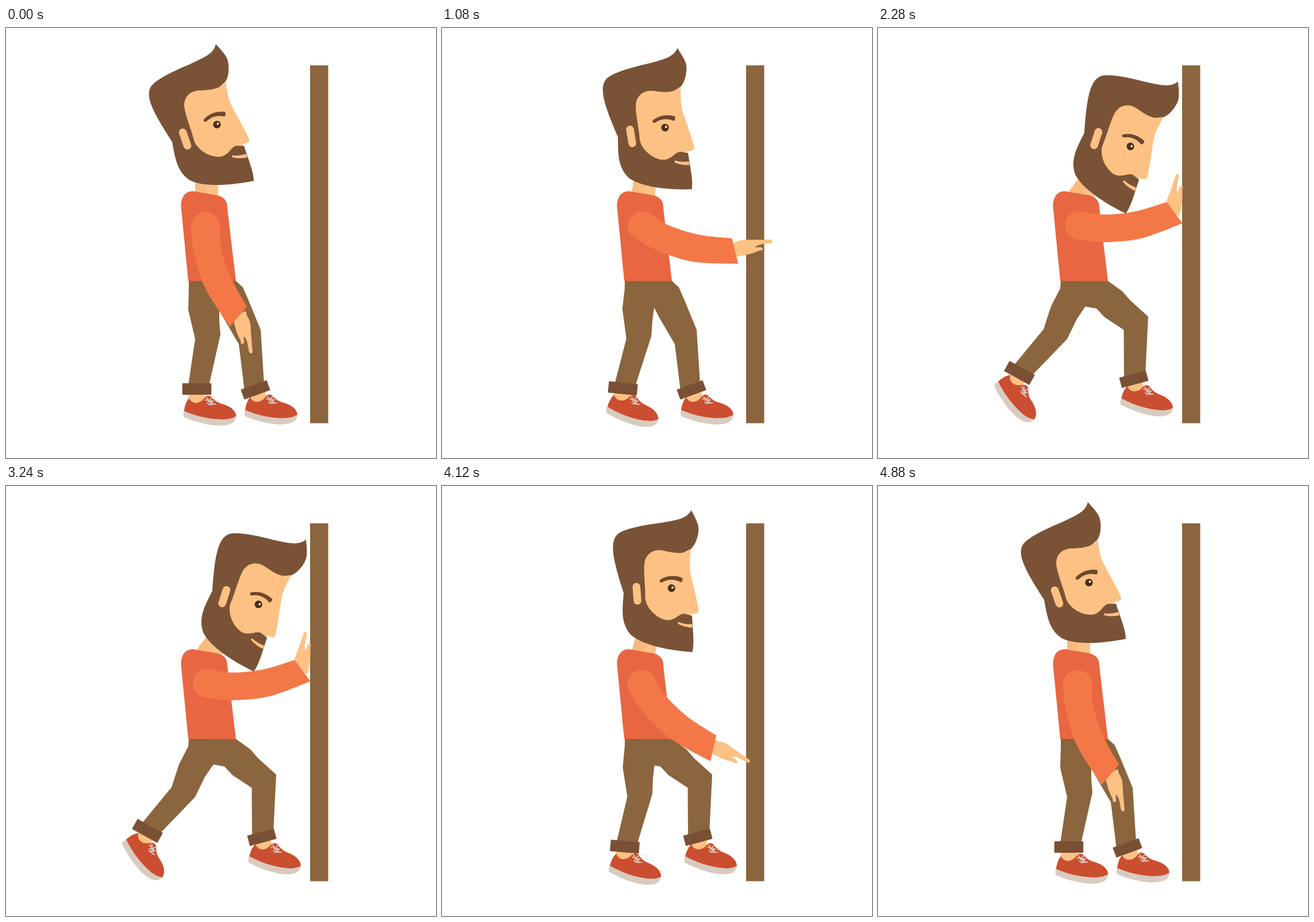
These frames come from a looping animation (748x748 px, 6 s). An HTML page with a canvas:

```html
<!DOCTYPE html>
<html lang="en">
<head>
<meta charset="utf-8">
<title>Pushing a wall</title>
<style>
html, body { margin: 0; width: 100%; height: 100%; overflow: hidden; background: #fff; }
canvas { display: block; width: 100%; height: 100%; }
</style>
</head>
<body>
<canvas id="stage" width="748" height="748"></canvas>
<script>
const ctx = document.getElementById('stage').getContext('2d');
const LOOP = 6000, STEP = 40, RAD = Math.PI / 180;
const C = {
  wood: '#8b653e', cuff: '#7a5035', hair: '#7a5236', dark: '#6d482d', skin: '#fdc184',
  neck: '#f8ba7d', torso: '#e86642', arm: '#f47847', shoe: '#cb4e30', sole: '#d8cbc0', eye: '#4c2d18'
};

const linear = x => x;
const smooth = x => x * x * (3 - 2 * x);
const mix = (a, b, p) => a + (b - a) * p;
const mixPoints = (a, b, p) => a.map((v, i) => [mix(v[0], b[i][0], p), mix(v[1], b[i][1], p)]);
const phase = (t, from, to, ease) => ease(Math.min(1, Math.max(0, (t - from) / (to - from))));
const polar = ([x, y], angle, r) => [x + r * Math.cos(angle * RAD), y + r * Math.sin(angle * RAD)];

function fill(path, color) {
  ctx.fillStyle = color;
  ctx.fill(path);
}

function poly(points, color) {
  const path = new Path2D();
  points.forEach(p => path.lineTo(p[0], p[1]));
  path.closePath();
  fill(path, color);
}

// Smooth curve through all points
function spline(path, points) {
  const at = i => points[Math.min(points.length - 1, Math.max(0, i))];
  path.lineTo(...points[0]);
  for (let i = 0; i < points.length - 1; i++) {
    const [a, b, c, d] = [at(i - 1), at(i), at(i + 1), at(i + 2)];
    path.bezierCurveTo(b[0] + (c[0] - a[0]) / 6, b[1] + (c[1] - a[1]) / 6,
      c[0] - (d[0] - b[0]) / 6, c[1] - (d[1] - b[1]) / 6, c[0], c[1]);
  }
}

function placed(x, y, angle, draw) {
  ctx.save();
  ctx.translate(x, y);
  ctx.rotate(angle * RAD);
  draw();
  ctx.restore();
}

function stroke(path, color, width) {
  ctx.strokeStyle = color;
  ctx.lineWidth = width;
  ctx.lineCap = ctx.lineJoin = 'round';
  ctx.stroke(path);
}

function dot(x, y, r, color) {
  const path = new Path2D();
  path.arc(x, y, r, 0, 7);
  fill(path, color);
}

// Shoe, relative to the middle of its length
const ANKLE = new Path2D('M-36 -46H-11L-8 -33L-16 -22H-32L-37 -31Z');
const SHOE = new Path2D('M-45 -8C-44 -18 -41 -27 -36 -32C-31 -21 -17 -21 -9 -33Q-4 -39 2 -35C8 -28 14 -24 22 -22C36 -18 46 -10 46 0C30 10 -10 4 -45 -8Z');
const SOLE = new Path2D('M-45 -10Q-47 -3 -45 1C-26 9 -6 14 10 15.500C30 17 46 13 45.500 -1C30 10 -8 6 -45 -10Z');
const LACES = new Path2D('M-8 -29L6 -27L-2 -21L10 -22M4 -34L-4 -23M-6 -33L6 -21');

function foot(x, y, angle) {
  placed(x, y, angle, () => {
    fill(ANKLE, C.skin);
    fill(SHOE, C.shoe);
    fill(SOLE, C.sole);
    stroke(LACES, C.sole, 1.8);
  });
}

function cuff(x, y, angle, w, h) {
  placed(x, y, angle, () => {
    ctx.fillStyle = C.cuff;
    ctx.beginPath();
    ctx.roundRect(-w / 2, -h / 2, w, h, 1);
    ctx.fill();
  });
}

function backLeg(p) {
  const q = p * p;
  const x = 332 - 86 * p, y = 628 - 28 * q, turn = 29 * p;
  const hem = (dx, dy) => polar([x, y], turn + Math.atan2(dy, dx) / RAD, Math.hypot(dx, dy));
  foot(354.5 - 118 * p, 676 - 24.5 * q, 41 * p);
  poly([
    [318, 440], [318 - p, 453], [317 - 16 * p, 490 - 6 * p],
    [329 - 41 * p, 541 - 17 * q], hem(-15, -6), hem(21, -6),
    [373 - 44 * p, 533 + 18 * p - 10 * q], [371 - 25 * p, 510 - 4 * p],
    [371 - 10 * p, 488 - 4 * p], [385, 440]
  ], C.wood);
  cuff(x, y, turn, 50.5, 20);
}

const STAND = [[330, 440], [400, 440], [412, 451], [422, 474], [443, 525], [449, 620],
  [415, 632], [405, 550], [377, 502], [369, 486], [363, 484]];
const LUNGE = [[330, 440], [400, 440], [425, 458], [439, 474], [470, 502], [465, 604],
  [428, 612], [427.5, 525], [394, 503], [380, 488], [358, 484]];

function frontLeg(p) {
  foot(mix(461, 467, p), mix(674, 658, p), mix(-0.5, 5, p));
  poly(mixPoints(STAND, LUNGE, p), C.wood);
  cuff(mix(434, 445, p), mix(629.5, 611, p), mix(-20, -15, p), 48, 18.5);
}

const TORSO = new Path2D('M304.500 311C304 296 311 283 326 284L364 290.500Q382 293 384.500 307L386 322L400 440.500L317 440Z');
const HEAD = new Path2D('M365 28C361 45 345 51 320 63C296 73 262 88 252 102C241 120 258 150 289 198C294 225 297 250 320 265C345 277 390 274 431 266C431 250 422 230 414 205L395 204L370 104L382 93C388 85 390 62 383 50C377 40 370 34 365 28Z');
const FACE = new Path2D('M382 93C385 115 388 127 394 138C405 158 416 178 423 193Q424 199 416 201Q407 203 414 205H400C390 208 388 222 372 224C350 225 330 208 327 195C322 175 311 150 310 135C310 118 322 109 337 108.500C355 108 372 107 382 93Z');
const MOUTH = new Path2D('M394 221.500Q406 223 418 219L420 225Q405 228 394 225Q392 223 394 221.500Z');
const BROW = new Path2D('M344 159C353 149 367 144 381 146Q383 150 380.500 154C367 151 357 154 348 163Q343 164 344 159Z');
const EAR = new Path2D('M307.500 181.500L315.500 204.500');
const LID = new Path2D();
LID.arc(367, 168, 6.8, -0.35, Math.PI - 0.35);

function head(angle, closed) {
  placed(346.5, 294.4, angle, () => {
    ctx.translate(-346.5, -294.4);
    fill(HEAD, C.hair);
    fill(FACE, C.skin);
    fill(MOUTH, C.skin);
    fill(BROW, C.dark);
    stroke(EAR, C.skin, 13.5);
    if (closed) {
      stroke(LID, '#cf9867', 1.1);
    } else {
      dot(367, 168, 6.6, C.eye);
      dot(368.5, 166.5, 2, '#f6e9dc');
    }
  });
}

function neck(angle) {
  placed(346.5, 294.4, angle, () => {
    ctx.fillStyle = C.skin;
    ctx.fillRect(-17.5, -42, 40, 42);
    ctx.fillStyle = C.neck;
    ctx.fillRect(-17.5, -42, 20, 42);
  });
}

const HAND = new Path2D('M-8 -14L0 -15Q10 -20 20 -19L36 -18L63 -17Q66.500 -16 66 -13.500Q65 -11 62 -11L49 -10Q38 -9 35 -5L46 -4.500Q50 -2 47 1C40 0 34 6 15 8L-2 10Z');
// Hand turn for a few arm angles
const WRIST = [[-5.5, -73], [4, -54], [18, 0], [44, 33], [72, 83]];

function handTurn(a) {
  let i = 1;
  while (i < WRIST.length - 1 && a > WRIST[i][0]) i++;
  const [a0, h0] = WRIST[i - 1], [a1, h1] = WRIST[i];
  return mix(h0, h1, (a - a0) / (a1 - a0));
}

function arm(p) {
  const a = mix(72, -5.5, p), bend = 13, half = 24;
  const shoulder = [347 + 3 * p * p, 345 - 2 * p * p];
  const upper = polar(shoulder, a + bend, 42);
  const elbow = polar(upper, a, 60);
  const wrist = polar(elbow, a - bend, 68);
  placed(wrist[0], wrist[1], handTurn(a), () => fill(HAND, C.skin));

  const side = s => [
    polar(shoulder, a + bend + 90 * s, 25),
    polar(upper, a + bend / 2 + 90 * s, half),
    polar(elbow, a - bend / 2 + 90 * s, half),
    polar(wrist, a - bend - 18 + 90 * s, 23)
  ];
  const path = new Path2D();
  spline(path, side(-1));
  spline(path, side(1).reverse());
  const start = (a + bend + 90) * RAD;
  path.arc(shoulder[0], shoulder[1], 25, start, start + Math.PI);
  path.closePath();
  fill(path, C.arm);
}

function draw(t) {
  const reach = phase(t, 120, 1480, linear) - phase(t, 3560, 4506, smooth);
  const lean = 37.1 * (phase(t, 840, 1760, linear) - phase(t, 3760, 4400, smooth));
  const back = phase(t, 820, 1720, smooth) - phase(t, 3450, 4250, linear);
  const front = phase(t, 1800, 2280, smooth) - phase(t, 4440, 4880, smooth);
  const closed = (t >= 1480 && t < 1600) || (t >= 3120 && t < 3240);

  ctx.fillStyle = '#fff';
  ctx.fillRect(0, 0, 748, 748);
  ctx.fillStyle = C.wood;
  ctx.fillRect(529, 65, 31.5, 622.5);
  backLeg(back);
  frontLeg(front);
  neck(lean);
  fill(TORSO, C.torso);
  head(lean, closed);
  arm(reach);
}

function tick() {
  const t = performance.now() % LOOP;
  draw(Math.floor(t / STEP) * STEP);
  requestAnimationFrame(tick);
}
tick();
</script>
</body>
</html>
```
